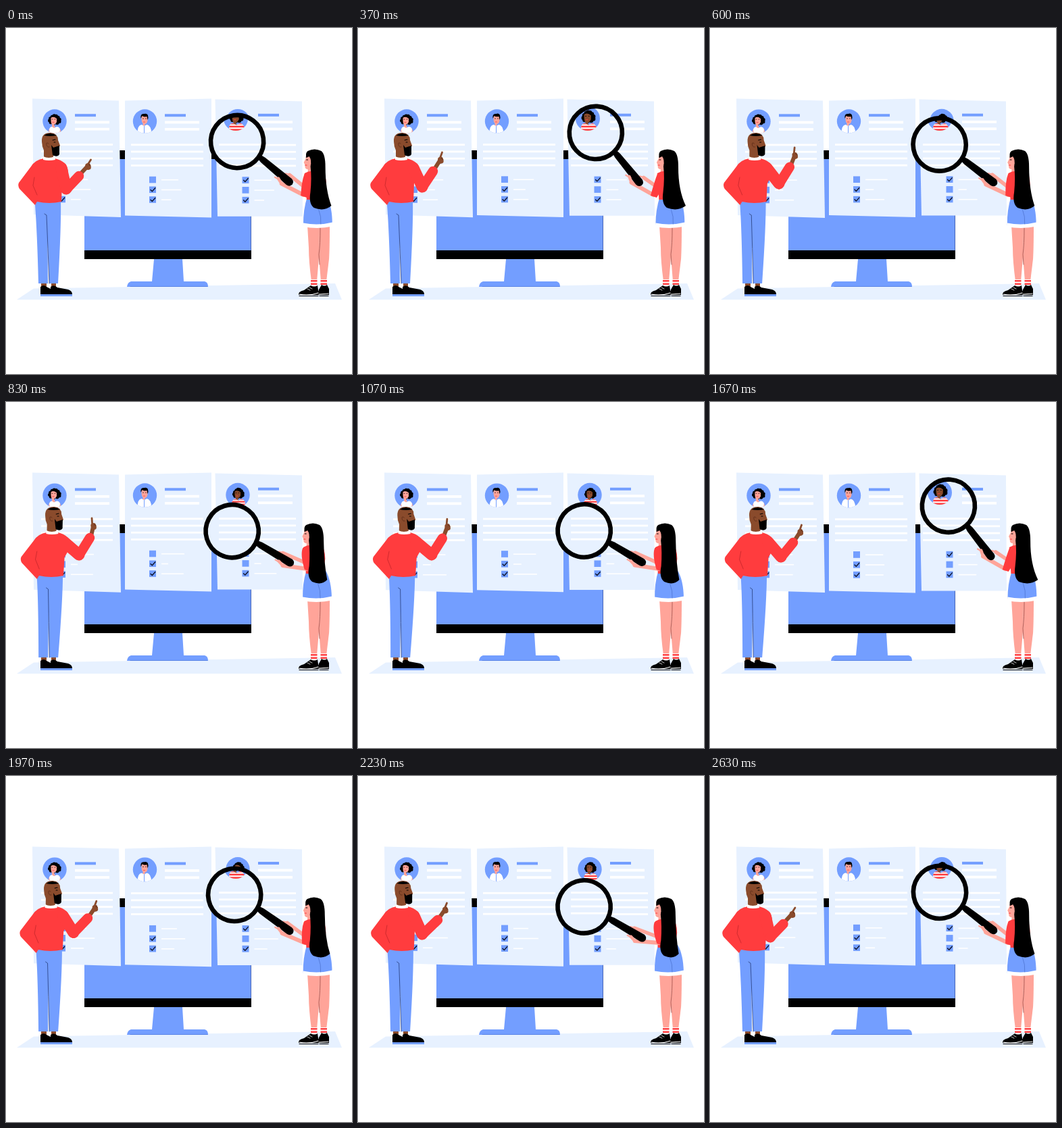
An HTML page with a canvas for the animation above (2670 ms loop, 512 by 512 pixels).

```html
<!DOCTYPE html>
<html lang="en">
<head>
<meta charset="utf-8">
<title>Reviewing candidates</title>
<style>
html, body { margin: 0; width: 100%; height: 100%; overflow: hidden; background: #fff; }
canvas { display: block; width: 512px; height: 512px; }
</style>
</head>
<body>
<canvas id="stage" width="512" height="512"></canvas>
<script>
const ctx = document.getElementById('stage').getContext('2d');
const LOOP = 2670, TAU = Math.PI * 2;
const BLUE = '#739eff', PALE = '#e7f1ff', RED = '#ff3c3e', SKIN = '#ffa499', BROWN = '#8a4b2c', BLACK = '#000', WHITE = '#fff';
const KEYS = [0, 370, 830, 1270, 1670, 2230];

// Smooth periodic curve through values at KEYS.
function track(...values) {
  const n = KEYS.length;
  const time = k => KEYS[(k + n) % n] + Math.floor(k / n) * LOOP;
  const value = k => values[(k + n) % n];
  const slope = k => (value(k + 1) - value(k - 1)) / (time(k + 1) - time(k - 1));
  return t => {
    let i = n - 1;
    while (KEYS[i] > t) i--;
    const d = time(i + 1) - time(i), u = (t - time(i)) / d, v = 1 - u;
    return v * v * (1 + 2 * u) * value(i) + u * u * (3 - 2 * u) * value(i + 1)
      + d * u * v * (v * slope(i) - u * slope(i + 1));
  };
}

const man = {
  lean: track(0, 0, 1, 1, 1, .25),
  elbowX: track(89, 95, 108, 108, 105, 95),
  elbowY: track(238, 235, 226, 227, 229, 234),
  cuffX: track(110, 113, 126, 126, 125, 120),
  cuffY: track(216, 209, 198, 201, 205, 210),
  tipX: track(126, 125, 127.5, 136, 136, 132),
  tipY: track(194, 183, 171, 175, 181, 187)
};

function fill(color, d) {
  ctx.fillStyle = color;
  ctx.fill(new Path2D(d));
}
function stroke(color, width, d) {
  ctx.strokeStyle = color;
  ctx.lineWidth = width;
  ctx.stroke(new Path2D(d));
}
function rect(color, x, y, w, h) {
  ctx.fillStyle = color;
  ctx.fillRect(x, y, w, h);
}
function disc(color, x, y, rx, ry = rx) {
  ctx.fillStyle = color;
  ctx.beginPath();
  ctx.ellipse(x, y, rx, ry, 0, 0, TAU);
  ctx.fill();
}
function group(draw) {
  ctx.save();
  draw();
  ctx.restore();
}
function clipDisc(x, y, r) {
  ctx.beginPath();
  ctx.arc(x, y, r, 0, TAU);
  ctx.clip();
}
// Horizontal shear: moves points at height top by dx, leaves base in place.
function leanBy(dx, top, base) {
  const k = dx / (base - top);
  ctx.transform(1, 0, -k, 1, k * base, 0);
}

// Curly hair, wider towards the shoulders, around a face.
function curls(skin, width) {
  for (let i = 0; i < 11; i++) {
    const a = i / 11 * TAU, s = Math.sin(a);
    disc(BLACK, (width + 2 * s) * Math.cos(a), -2.5 + 5.5 * s, 2.7);
  }
  disc(BLACK, 0, -3, width, 6);
  fill(skin, 'M-5.500 -5 Q-2 -8 3 -4 L3 1 Q1 5 -1 5 L1 10 H-4 V5 Q-6 2 -5.500 -5 Z');
  stroke(BLACK, .7, 'M-4 -3 h1 M0 -3 h1');
  stroke(RED, .9, 'M-3 1.500 h2');
}
const portraits = [
  () => {
    curls(SKIN, 7);
    fill(SKIN, 'M-10 18 L-8 11 H8 L10 18 Z');
    fill(WHITE, 'M-7 18 L-8 12 Q-7 8 -4 8 L-1 10 L3 8 Q7 8 8 12 L7 18 Z');
  },
  () => {
    fill(SKIN, 'M-5 -8 H4 V-1 Q3 4 0 4 V8 H-3 V3 Q-5 1 -5 -3 Z');
    fill(BLACK, 'M-6 -4 Q-7 -12 -1 -11 Q5 -13 5 -5 L4 -2 L3 -7 Q-2 -6 -4 -8 Z');
    fill(WHITE, 'M-11 18 Q-11 6 -5 5 L-1 7 L3 5 Q9 6 10 18 Z');
    stroke(BLACK, .7, 'M-3 -4 h1 M1 -4 h1');
    stroke(RED, .8, 'M-2 1 h2');
    stroke(BLUE, 1, 'M-1 7 V17');
  },
  () => {
    ctx.translate(1, 0);
    curls(BROWN, 6);
    ctx.clip(new Path2D('M-9 16 Q-11 7 -5 6 L0 8 L5 6 Q11 8 10 16 Z'));
    rect(WHITE, -12, 5, 24, 13);
    for (let y = 5; y < 17; y += 4) rect(RED, -12, y, 24, 2.2);
  }
];
function avatar(kind, x, y, r, scale = 1) {
  group(() => {
    disc(BLUE, x, y, r);
    clipDisc(x, y, r);
    ctx.translate(x, y);
    ctx.scale(scale, scale);
    portraits[kind]();
  });
}

const cards = [
  { shape: 'M39 104.500 L167 107.500 L170 280 L41 276 Z', x: 72, y: 138, bar: 102, left: 52, right: 158, box: 83, checks: [0, 0, 1], delay: 0 },
  { shape: 'M176 107.500 L304 104.500 V280 L176 277 Z', x: 205.5, y: 138, bar: 235, left: 185, right: 292, box: 217, checks: [0, 1, 1], delay: 420 },
  { shape: 'M309.500 105.500 L438 108.500 L439 277.500 H313 Z', x: 343, y: 137.5, bar: 373, left: 315, right: 429, box: 354.5, checks: [1, 0, 1], delay: 680 }
];
function drawText(card) {
  rect(BLUE, card.bar, card.y - 10.8, 31, 4);
  for (const dy of [-.4, 9.8]) rect(WHITE, card.bar, card.y + dy, 51, 3.8);
  for (let i = 0; i < 4; i++) rect(WHITE, card.left, 171.2 + i * 10.2, card.right - card.left, 2.8);
}
function drawCard(card, kind, t) {
  const wave = shift => Math.sin(TAU * (t / LOOP - shift));
  const lengths = [41 + 6 * wave(.08), 36.5 - 13.5 * wave(.07), 37 + 11 * wave(.165)];
  const drop = 1.2 - 1.3 * Math.cos(TAU * (t - card.delay) / LOOP);
  group(() => {
    ctx.translate(0, 105);
    ctx.scale(1, 1 + drop / 175);
    ctx.translate(0, -105);
    fill(PALE, card.shape);
    avatar(kind, card.x, card.y, 17.7);
    drawText(card);
    card.checks.forEach((checked, i) => {
      const y = 224.4 + i * 14.7, x = card.box;
      rect(BLUE, x - 5, y - 5, 10, 9.6);
      if (checked) stroke('#10162c', 1.4, `M${x - 3} ${y} l2.300 2.300 l4.500 -5`);
      rect(WHITE, x + 13, y - .8, lengths[i] - 13, 1.6);
    });
  });
}

function drawMonitor() {
  fill(PALE, 'M41 385.500 L487 378 L497 402 H16 Z');
  rect(BLACK, 116, 181, 247, 161);
  rect(BLUE, 116, 194, 247, 135);
  rect('#3d58a6', 362, 194, .8, 135);
  fill(BLUE, 'M219 342 H261 L263 375 H294 Q299 376 299 383 H179 Q180 376 185 375 H216 Z');
  stroke('#5079db', .7, 'M184 382.500 H298');
}

function drawMan(t) {
  const lean = man.lean(t) * 5;
  const [ex, ey, cx, cy, tx, ty] = ['elbowX', 'elbowY', 'cuffX', 'cuffY', 'tipX', 'tipY'].map(name => man[name](t));

  fill(BROWN, 'M52 376 H60 V385 H52 Z M67 376 H74 V384 H67 Z');
  fill(BLACK, 'M51 394 V383 Q56 379 60 383 L66 386 V394 Z M66 394 V383 Q71 379 76 384 L92 387 Q98 389 98 394 Z');
  rect(BLUE, 51, 394, 47, 3);

  group(() => {
    leanBy(lean, 170, 385);
    fill(BLUE, 'M45 254 L81 254 Q82 290 77 378 H64 L61.500 310 L62 378 H48 Q46 300 43 262 Z');
    stroke('#263c79', .8, 'M57 275 L60 277 Q62 325 64 378');
    fill(RED, 'M56 193 Q43 195 37 205 L19 229 Q17 233 20 238 L43 262 L46 257 Q64 261 82 257 L83 230 L92 213 Q91 197 72 193 Z');
    stroke('#c4262b', .8, 'M42 221 L40 233 L46 247');
    fill(BROWN, 'M53 168 Q52 155 66 155 Q77 156 77 166 L80 174 L78 177 L78 188 L70 189 V193 H56 V181 Q53 175 53 168 Z');
    fill(BLACK, 'M56 159 Q65 153 75 159 Q65 161 56 159 Z');
    fill(BLACK, 'M67 173 L70 177 L79 174 L79 187 Q76 192 69 188 Z');
    fill(WHITE, 'M55 190 Q63 194 72 190 L73 195 Q63 197 55 195 Z');
    stroke(BLACK, 1, 'M69 166 l4 -1 M71 169 h2');
    stroke('#5d2c18', .8, 'M63 171 q-4 -3 -3 2 q1 4 4 3');
  });

  const px = cx + (tx - cx) * .55 + 2.5, py = cy + (ty - cy) * .55;
  stroke(BROWN, 6, `M${cx} ${cy} L${px} ${py}`);
  stroke(BROWN, 8, `M${px} ${py} l.5 2`);
  stroke(BROWN, 2.8, `M${px - 1.5} ${py} L${tx - .5} ${ty + 1}`);
  stroke('#542714', .8, `M${px + 1} ${py - 2} l3 2`);
  stroke(RED, 17, `M${82 + lean * .8} 207 L${ex} ${ey}`);
  stroke(RED, 14.5, `M${ex} ${ey + 1} L${cx - 2} ${cy + 3}`);
}

// swing runs from -1 (lens low) to 1 (lens high).
function lensPose(swing) {
  return {
    x: 339.2 + 9.5 * swing + 4.9 * swing * swing,
    y: 173.5 - 20.5 * swing,
    angle: (33.8 + 11.2 * swing + 5 * swing * swing) * Math.PI / 180
  };
}
function drawLens(lens) {
  group(() => {
    clipDisc(lens.x, lens.y, 38);
    rect(PALE, lens.x - 40, lens.y - 40, 80, 80);
    drawText(cards[2]);
    avatar(2, 340, 134, 18, 1.18);
  });
  group(() => {
    ctx.translate(lens.x, lens.y);
    ctx.rotate(lens.angle);
    ctx.strokeStyle = BLACK;
    ctx.lineWidth = 6.6;
    ctx.beginPath();
    ctx.arc(0, 0, 39.1, 0, TAU);
    ctx.stroke();
    ctx.translate(39, -1.8);
    ctx.rotate(.05);
    fill(BLACK, 'M0 -3.500 L8 -4.800 L58 -6 Q64 -5.500 64.500 0 Q64 5.500 58 6 L8 4.800 L0 3.500 Z');
  });
}

function drawWoman(swing, lens) {
  const lean = 2.2 * swing - 1;
  const tail = 5.5 * swing;
  const elbow = 439.5 - 5 * swing;
  const grip = (along, across) => {
    const c = Math.cos(lens.angle), s = Math.sin(lens.angle);
    return [lens.x + along * c - across * s, lens.y + along * s + across * c];
  };
  const [ux, uy] = grip(84 + 9 * swing, -6);
  const [lx, ly] = grip(80, 8);
  const [fx, fy] = grip(90, 10);

  fill(SKIN, 'M446 292 H464 Q464 320 463 340 L460 375 H452 Q448 345 448 325 Z');
  fill(SKIN, 'M464 292 H479 Q479 325 478 342 L474 375 H466 L463 338 Z');
  stroke('#8d403b', .7, 'M465 296 Q465 320 463 335 L464 350');
  for (const x of [451, 465.5]) {
    rect(WHITE, x, 372, 9.5, 12);
    rect(RED, x, 373, 9.5, 2.5);
    rect(RED, x, 377.5, 9.5, 2.5);
  }
  fill(BLACK, 'M433 395 Q432 390 441 388 L451 381 Q456 384 461 381 L463 395 Z M461 395 L463 387 L467 380 Q471 383 475 380 L478 386 V395 Z');
  stroke(WHITE, 1.2, 'M434 394 Q448 397 462 392 M463 394 L477 393');
  stroke(BLACK, 1.2, 'M434 396.500 H462 M464 396.500 H477');
  stroke(WHITE, .8, 'M446 386 l4 2 M449 384 l4 2');

  // far arm
  stroke(SKIN, 5.5, `M${444 + lean} 237 L${ux + 5} ${uy + 2}`);
  stroke(SKIN, 2.4, `M${ux + 6} ${uy + 2} L${ux - 1} ${uy}`);

  group(() => {
    leanBy(lean * .6, 250, 340);
    fill(BLUE, 'M446 250 L475 250 Q483 264 483 291 L440 292 Q440 268 446 250 Z');
    fill(WHITE, 'M440 288.500 Q462 293 483.500 287.500 V293.500 Q462 298 439.500 294 Z');
    stroke('#496fca', .7, 'M463 269 Q467 279 466 290');
  });

  group(() => {
    leanBy(lean, 190, 290);
    fill(SKIN, 'M445 187 H457 V217 H447 V209 Q442 209 443 203 L441 199 L444 193 Z');
    fill(RED, 'M442 215 Q449 211 456 212 L469 213 Q474 216 474 232 L470 254 H445 Z');
    stroke(BLACK, 1, 'M444.500 191 l3 -1 M445 195 h2');
    stroke(RED, 1.1, 'M443 203 h2.500');
  });

  // near arm
  stroke(SKIN, 6, `M${elbow + 2} 247 L${fx} ${fy}`);
  fill(RED, `M${442 + lean} 216 Q${438 + lean} 226 ${elbow - 2} 248 L${elbow + 7} 251 L${453 + lean} 232 V216 Z`);

  drawLens(lens);

  stroke(SKIN, 4.5, `M${fx} ${fy} L${lx + 2} ${ly}`);
  stroke(SKIN, 2.4, `M${lx + 4} ${ly + 2} L${lx - 3} ${ly - 2}`);

  const x = lean;
  fill(BLACK, `M${445 + x} 192 Q${443 + x} 185 ${447 + x} 182 Q${457 + x} 177 ${467 + x} 182
    Q${473 + x} 187 ${473 + x} 205 Q${473 + x * .8} 240 ${480 + tail} 263
    Q${470 + tail * .6} 272 ${455 + tail * .4} 266 Q${447 + tail * .4} 260 ${450 + tail * .3} 243
    Q${453 + x} 222 ${451 + x} 205 Q${453 + x} 195 ${449 + x} 190 Z`);
  stroke(SKIN, 1, `M${451 + x} 200 q-2 -4 -3 -1 q0 3 2 4`);
}

function draw(t) {
  const swing = Math.sin(TAU * (2 * t / LOOP + .042));
  rect(WHITE, 0, 0, 512, 512);
  ctx.lineCap = ctx.lineJoin = 'round';
  drawMonitor();
  cards.forEach((card, i) => drawCard(card, i, t));
  drawMan(t);
  drawWoman(swing, lensPose(swing));
}

const start = performance.now();
function frame() {
  draw((performance.now() - start) % LOOP);
  requestAnimationFrame(frame);
}
frame();
</script>
</body>
</html>
```
